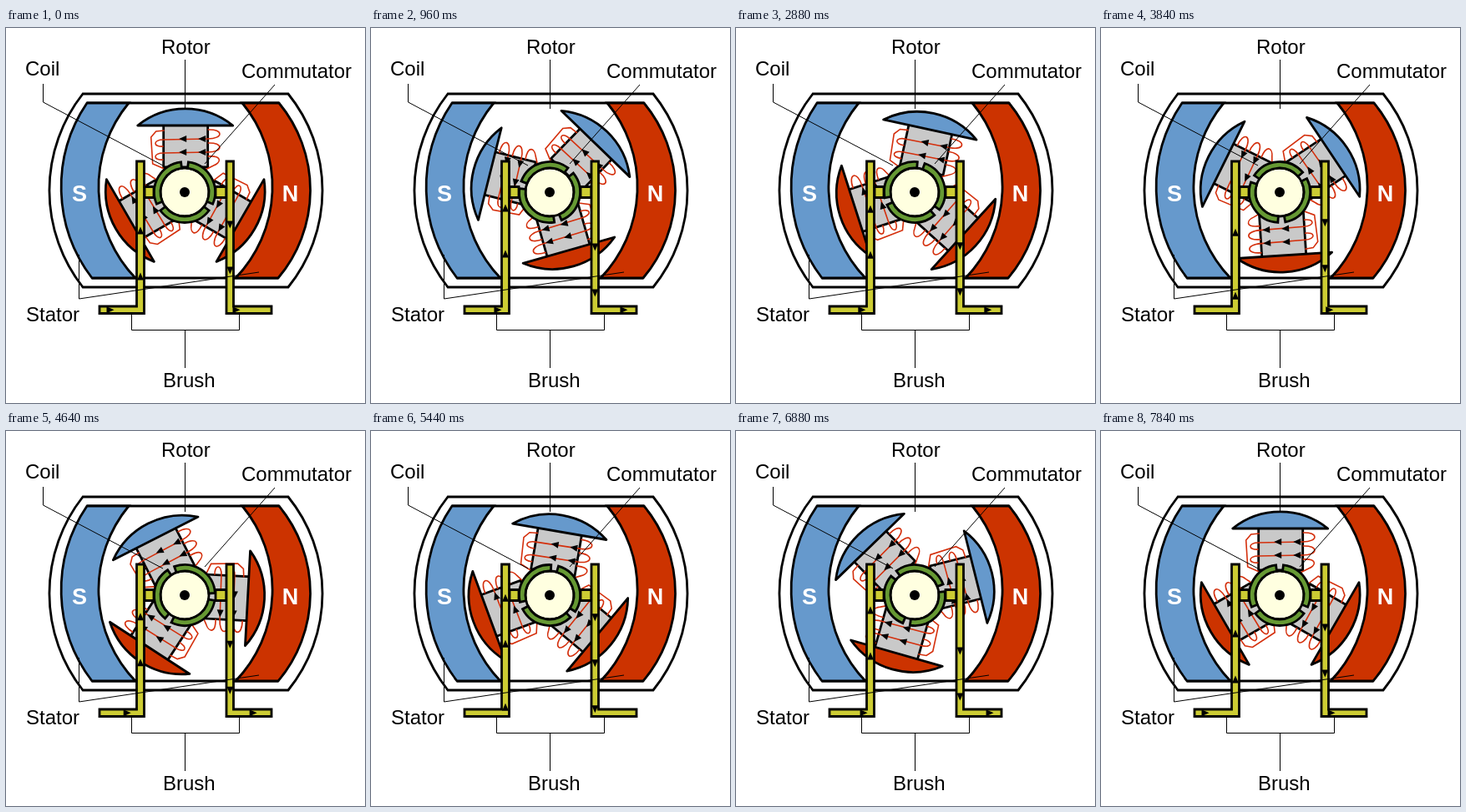
Recreate the animation shown at these times as an HTML page. Size 430 by 450 pixels, loop 8000 ms.

```html
<!DOCTYPE html>
<html lang="en">
<head>
<meta charset="utf-8">
<title>DC motor</title>
<style>
html, body { margin: 0; width: 100%; height: 100%; overflow: hidden; background: #fff; }
svg { display: block; width: 430px; height: 450px; font: 24px "Liberation Sans", Arial, sans-serif; }
.ink { stroke: #000; stroke-width: 2.8; }
.line { fill: none; stroke: #000; stroke-width: 1; }
.wire { fill: none; stroke: #d42f0c; stroke-width: 1.6; }
.pole { fill: #fff; font-weight: bold; font-size: 27px; text-anchor: middle; }
</style>
</head>
<body>
<svg viewBox="0 0 430 450">
  <defs>
    <g id="core">
      <path class="ink" fill="#c9c9c9" d="M-26 -26V-78H27V-26Z"/>
      <path class="wire" d="M-25 -24L-39 -30L-41 -62L-35 -69L-25 -70
        M27 -71C46 -72 46 -60 27 -60L-26 -59C-39 -59 -39 -50 -26 -51
        M27 -55C46 -56 46 -44 27 -44L-26 -43C-39 -43 -39 -34 -26 -35
        M27 -39C46 -40 42 -31 34 -28L24 -23"/>
    </g>
    <path id="head" d="M4.5 0L-4.5 -4V4Z"/>
  </defs>

  <g class="ink" fill="#fff">
    <path d="M92 79H338A184.600 184.600 0 0 1 338 311H92A188 188 0 0 1 92 79Z"/>
    <path d="M97 90H327M103 300H326"/>
    <path fill="#6699cc" d="M97 90H147A158 158 0 0 0 155 300H103A180 180 0 0 1 97 90Z"/>
    <path fill="#cc3300" d="M283 90H327A164 164 0 0 1 326 300H275A158 158 0 0 0 283 90Z"/>
  </g>
  <text class="pole" x="88" y="208">S</text>
  <text class="pole" x="340.500" y="208">N</text>

  <g id="rotor"></g>

  <g class="ink" fill="#cccc33">
    <path d="M166 190.500H177V203.500H166ZM251 190.500H264V203.500H251Z"/>
    <path d="M156.500 160H165.500V342.500H112V334H156.500Z"/>
    <path d="M264 160H272.500V334H318V342.500H264Z"/>
  </g>
  <g id="flow"></g>

  <path class="line" d="M214.500 38V97M44.500 67V89L188 165M322 68L238 163
    M87.500 272V325L303 293M150.500 342V362.500H279.500V342M214.500 362V408"/>
  <text x="186" y="31">Rotor</text>
  <text x="23" y="57">Coil</text>
  <text x="282" y="60">Commutator</text>
  <text x="24" y="352">Stator</text>
  <text x="188" y="431">Brush</text>
</svg>
<script>
const STEP = 160, FRAMES = 50, TURN = 49;
const BLUE = '#6699cc', RED = '#cc3300';
const rotor = document.getElementById('rotor');
const flow = document.getElementById('flow');

const head = (x, y, angle) =>
  `<use href="#head" transform="translate(${x} ${y}) rotate(${angle})"/>`;

const polar = (r, deg) => {
  const a = deg * Math.PI / 180;
  return `${(r * Math.sin(a)).toFixed(2)} ${(-r * Math.cos(a)).toFixed(2)}`;
};

// An arm flips polarity when its commutator gap passes a brush.
function arm(angle) {
  const south = Math.cos(angle * Math.PI / 180) >= 0;
  const heads = [[20, -60], [-3, -60], [20, -44], [-3, -44]]
    .map(([x, y]) => head(x, y, south ? 180 : 0)).join('');
  return `<g transform="rotate(${angle})"><use href="#core"/>${heads}
    <path class="ink" fill="${south ? BLUE : RED}" stroke-linejoin="round"
      d="M-57 -76A91 91 0 0 1 57 -76Z"/></g>`;
}

function segment(angle) {
  const a = angle + 7, b = angle + 113;
  return `<path class="ink" fill="#669933" d="M${polar(36.5, a)}A36.500 36.500 0 0 1 ${polar(36.5, b)}
    L${polar(29, b)}A29 29 0 0 0 ${polar(29, a)}Z"/>`;
}

// Current runs right, then up the left brush.
function leftHead(s) {
  return s < 49 ? head(112 + s, 338.3, 0) : head(161, 387 - s, -90);
}

// Current runs down the right brush, then right.
function rightHead(y) {
  return y < 338 ? head(268.3, y, 90) : head(y - 70, 338.3, 0);
}

function draw(k) {
  const turn = k * 360 / TURN;
  const spokes = [0, 120, 240];
  // The arms wobble: their hub sits slightly off the shaft.
  rotor.innerHTML =
    `<g transform="translate(214.7 195) rotate(${turn}) translate(0 -2)">${spokes.map(arm_ => arm(arm_, turn)).join('')}</g>`;
  rotor.innerHTML =
    `<g transform="translate(214.7 195) translate(${polar(2, turn)})">
      ${spokes.map(a => arm(a + turn)).join('')}</g>
    <g transform="translate(214 197)"><circle class="ink" r="29" fill="#ffffe0"/>
      ${spokes.map(a => segment(a + turn)).join('')}<circle r="6"/></g>`;

  const shift = 55 * (k * 4 % TURN) / TURN;
  const left = [13, 89, 144].map(s => s + shift).filter(s => s < 187);
  const right = [181, 236, 291, 346].map(y => y + shift).filter(y => y > 211 && y < 384);
  flow.innerHTML = left.map(leftHead).join('') + right.map(rightHead).join('');
}

const start = performance.now();
let shown = -1;
function tick() {
  const k = Math.floor((performance.now() - start) / STEP) % FRAMES;
  if (k !== shown) draw(shown = k);
  requestAnimationFrame(tick);
}
tick();
</script>
</body>
</html>
```
